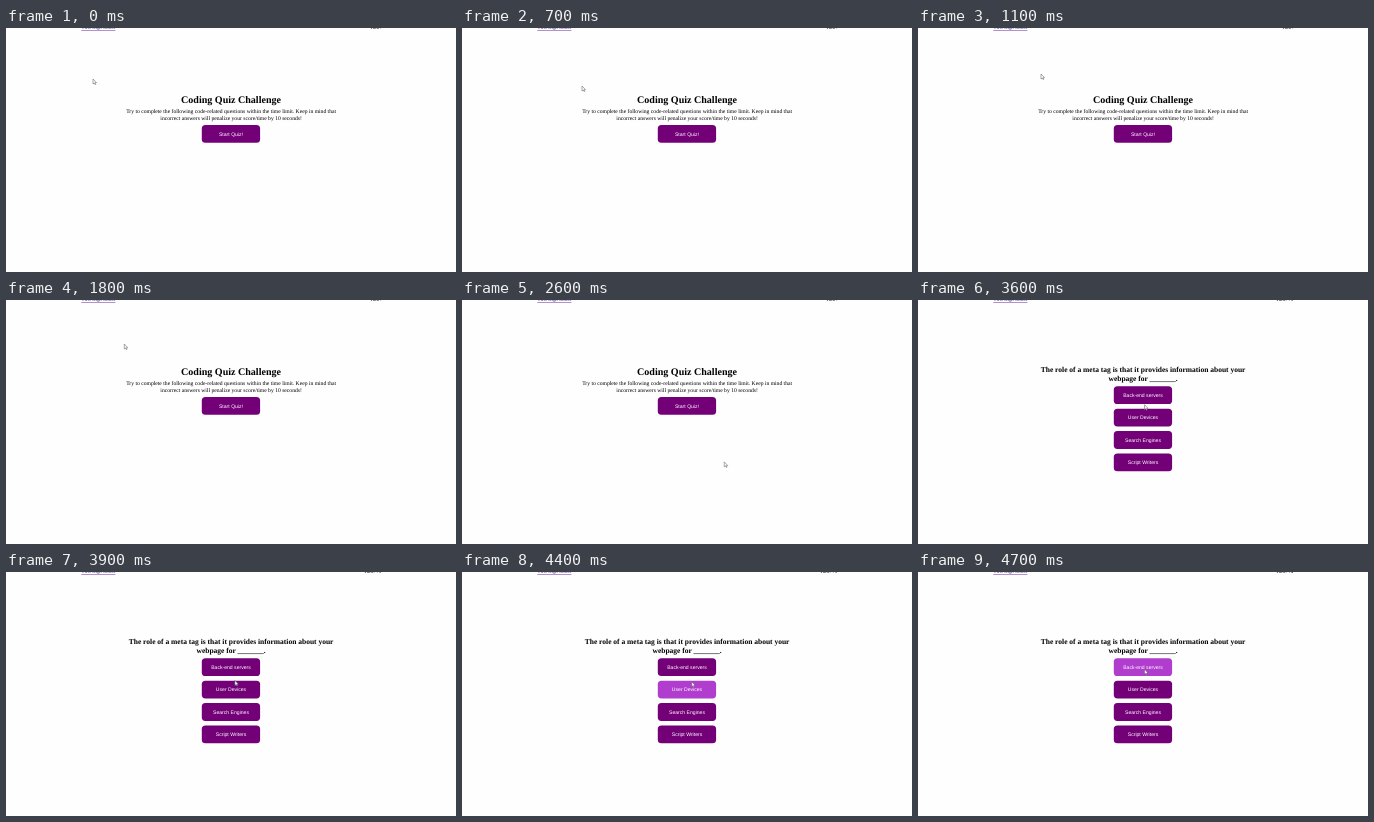
Animation, 450 px wide and 244 px high, one loop 5000 ms. Source, as an HTML page:

```html
<!DOCTYPE html>
<html lang="en">
<head>
<meta charset="utf-8">
<title>Coding Quiz</title>
<style>
  html, body { margin: 0; width: 100%; height: 100%; overflow: hidden; background: #fefefe; }
  svg { display: block; width: 100vw; height: 100vh; }
  text { font-family: "Liberation Serif", serif; font-size: 5.64px; text-rendering: geometricPrecision; }
  .mid { text-anchor: middle; }
  .header { font-size: 4.69px; }
  .link { fill: #551a8b; text-decoration: underline; }
  .title { font-size: 10.05px; font-weight: bold; }
  .question { font-size: 7.5px; font-weight: bold; }
  .button text { font: 5.1px "Liberation Sans", sans-serif; fill: #fff; text-anchor: middle; }
</style>
</head>
<body>
<svg viewBox="0 0 450 244">
  <text class="header link" x="75.3" y="1">View High Scores</text>
  <text class="header" id="timer" x="375" y="1.4" text-anchor="end"></text>
  <g id="intro">
    <text class="mid title" x="225" y="75">Coding Quiz Challenge</text>
    <text class="mid" x="225.1" y="85">Try to complete the following code-related questions within the time limit. Keep in mind that</text>
    <text class="mid" x="225.1" y="91.5">incorrect answers will penalize your score/time by 10 seconds!</text>
  </g>
  <g id="quiz">
    <text class="mid question" x="225.1" y="72.4">The role of a meta tag is that it provides information about your</text>
    <text class="mid question" x="225.1" y="80.7">webpage for _______.</text>
  </g>
  <path id="cursor" d="M0 0V5L1.2 4 2 5.6 2.7 5.3 2 3.7H3.5Z" fill="#fff" stroke="#555" stroke-width=".5"/>
</svg>
<script>
const LOOP = 5000, STEP = 100, QUIZ_START = 3600, TICK = 4600;
const BUTTON = { x: 195.8, width: 58.3, height: 17.8, rx: 3.6 };
const BUTTON_TOP = 86.2, BUTTON_GAP = 22.45;
const byId = id => document.getElementById(id);

// Each pointer move eases to its end position, then rests until the next one.
const origin = { x: 87, y: 51 };
const moves = [
  { from: 0, to: 300, x: 120, y: 58 },
  { from: 700, to: 1100, x: 123, y: 46 },
  { from: 1300, to: 1500, x: 118.3, y: 44 },
  { from: 1800, to: 1900, x: 110, y: 40 },
  { from: 2100, to: 2200, x: 231, y: 162 },
  { from: 2300, to: 2500, x: 278, y: 187 },
  { from: 2500, to: 3100, x: 226.5, y: 104.7 },
  { from: 3600, to: 4200, x: 229.7, y: 109.7 },
  { from: 4400, to: 4700, x: 226.5, y: 97.3 }
];

const easeOut = k => 1 - (1 - k) ** 2;

function pointerAt(time) {
  let { x, y } = origin;
  for (const move of moves) {
    const progress = (time - move.from) / (move.to - move.from);
    const k = easeOut(Math.min(1, Math.max(0, progress)));
    x += (move.x - x) * k;
    y += (move.y - y) * k;
  }
  return { x, y };
}

function svgNode(parent, tag, attributes) {
  const node = document.createElementNS("http://www.w3.org/2000/svg", tag);
  for (const name in attributes) node.setAttribute(name, attributes[name]);
  return parent.appendChild(node);
}

function addButton(scene, label, y) {
  const group = svgNode(byId(scene), "g", { class: "button" });
  const rect = svgNode(group, "rect", { ...BUTTON, y });
  svgNode(group, "text", { x: 225, y: y + 10.5 }).textContent = label;
  return { scene, rect, y };
}

const answers = ["Back-end servers", "User Devices", "Search Engines", "Script Writers"];
const buttons = [
  addButton("intro", "Start Quiz!", 97),
  ...answers.map((label, i) => addButton("quiz", label, BUTTON_TOP + i * BUTTON_GAP))
];

function draw(now) {
  const time = Math.floor(now % LOOP / STEP) * STEP;
  const scene = time < QUIZ_START ? "intro" : "quiz";
  const { x, y } = pointerAt(time);

  for (const id of ["intro", "quiz"]) byId(id).style.display = id === scene ? "" : "none";
  byId("timer").textContent = "Time:" + (scene === "intro" ? "" : time < TICK ? " 75" : " 74");
  byId("cursor").setAttribute("transform", `translate(${x} ${y})`);

  for (const button of buttons) {
    const hovered = button.scene === scene
      && x > BUTTON.x && x < BUTTON.x + BUTTON.width
      && y > button.y && y < button.y + BUTTON.height;
    button.rect.setAttribute("fill", hovered ? "#b03dce" : "#740078");
  }
}

const start = performance.now();
function loop() {
  draw(performance.now() - start);
  requestAnimationFrame(loop);
}
loop();
</script>
</body>
</html>
```
